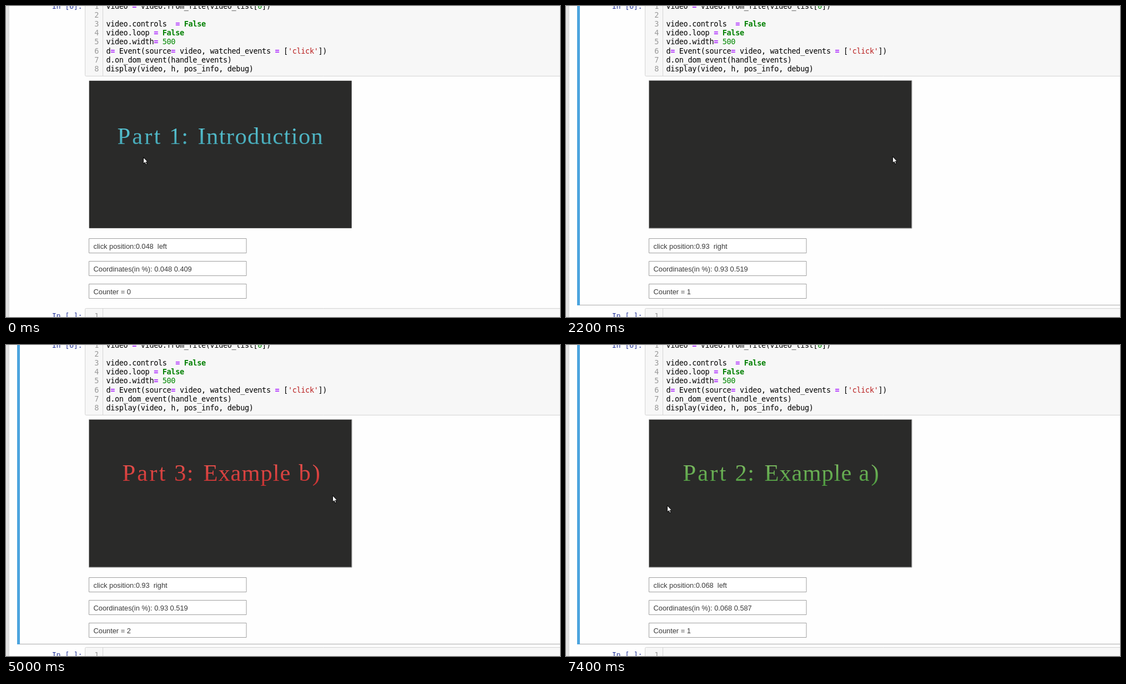
An HTML page with a canvas for the animation above (8000 ms loop, 998 by 561 pixels).

```html
<!DOCTYPE html>
<html lang="en">
<head>
<meta charset="utf-8">
<title>Notebook video player</title>
<style>
html, body { margin: 0; width: 100%; height: 100%; overflow: hidden; background: #fefefe; }
canvas { display: block; }
</style>
</head>
<body>
<canvas id="stage" width="998" height="561"></canvas>
<script>
const ctx = document.getElementById('stage').getContext('2d');
const W = 998, H = 561, LOOP = 8000, STEP = 100;
const MONO = '13.5px "DejaVu Sans Mono", monospace';
const SANS = '12.8px "Liberation Sans", Arial, sans-serif';
const SERIF = '42.6px "Liberation Serif", "Times New Roman", serif';
const TRACKING = '-0.33px', LINE = 16.2, FIRST_BASE = 4.5;

const code = [
  'video = Video.from_file(video_list[0])',
  '',
  'video.controls  = False',
  'video.loop = False',
  'video.width= 500',
  "d= Event(source= video, watched_events = ['click'])",
  'd.on_dom_event(handle_events)',
  'display(video, h, pos_info, debug)'
];

// Each word: text, left edge, letter spacing
const titles = {
  intro: { base: 249, colors: ['#58c6d6', '#42a0ae'], words: [
    ['Part', 200.5, 3.1], ['1:', 294, 1], ['Introduction', 345.5, 1.35]] },
  first: { base: 245, colors: ['#7cbc61', '#4f9c41'], words: [
    ['Part', 210.5, 3.1], ['2:', 304.5, 1.5], ['Example', 357.5, 0.9], ['a)', 527.5, 3]] },
  second: { base: 245, colors: ['#e8504c', '#c83333'], words: [
    ['Part', 209.5, 3.1], ['3:', 303, 1.5], ['Example', 355.5, 0.9], ['b)', 527.5, 3]] }
};

// Player state from each start time on
const scenes = [
  { at: 0, title: 'intro', x: '0.048', y: '0.409', count: 0 },
  { at: 1100, title: 'intro', x: '0.206', y: '0.523', count: 0 },
  { at: 2100, blank: true, x: '0.93', y: '0.519', count: 1 },
  { at: 2200, title: 'first', write: 2300, x: '0.93', y: '0.519', count: 1 },
  { at: 3700, title: 'second', write: 3800, x: '0.93', y: '0.519', count: 2 },
  { at: 6100, blank: true, x: '0.068', y: '0.587', count: 1 },
  { at: 6200, title: 'first', write: 6300, x: '0.068', y: '0.587', count: 1 }
];

const clamp = v => Math.min(1, Math.max(0, v));
const ease = v => v * v * (3 - 2 * v);

function rect(x, y, w, h, fill) {
  ctx.fillStyle = fill;
  ctx.fillRect(x, y, w, h);
}

function frame(x, y, w, h, color) {
  ctx.strokeStyle = color;
  ctx.lineWidth = 1;
  ctx.strokeRect(x, y, w, h);
}

function text(str, x, y, font, color, align = 'left') {
  ctx.font = font;
  ctx.fillStyle = color;
  ctx.textAlign = align;
  ctx.fillText(str, x, y);
}

function codeStyle(token) {
  if (token === '=') return ['bold ', '#aa22ff'];
  if (token === 'False') return ['bold ', '#008000'];
  if (token[0] === "'") return ['', '#ba2121'];
  if (/^\d+$/.test(token)) return ['', '#008800'];
  return ['', '#000'];
}

function codeLine(line, x, y) {
  for (const token of line.split(/(=|False|'.*?'|\b\d+\b)/)) {
    if (!token) continue;
    const [weight, color] = codeStyle(token);
    text(token, x, y, weight + MONO, color);
    x += ctx.measureText(token).width;
  }
}

function inputBox(y, h) {
  rect(143, y, W, h, '#f7f7f7');
  ctx.beginPath();
  ctx.roundRect(142.5, y, W, h, 2);
  ctx.moveTo(174.5, y);
  ctx.lineTo(174.5, y + h);
  ctx.strokeStyle = '#d4d4d4';
  ctx.lineWidth = 1;
  ctx.stroke();
}

function prompt(label, base) {
  text(label, 82.8, base, MONO, '#303f9f');
}

function lineNumber(n, base) {
  text(n, 167, base, MONO, '#999', 'right');
}

function drawPage(dy, selected) {
  rect(0, 0, W, H, '#fefefe');
  const edge = ctx.createLinearGradient(0, 0, 6, 0);
  edge.addColorStop(0, '#e6e6e6');
  edge.addColorStop(1, '#dedede');
  rect(0, 0, 6, H, edge);

  if (selected) {
    rect(20, 539 + dy, W, 1, '#ababab');
    rect(20, 0, 5, 540 + dy, '#4ca4de');
  }

  ctx.letterSpacing = TRACKING;
  inputBox(-20.5, 147);
  prompt('In [6]:', FIRST_BASE);
  code.forEach((line, i) => {
    const base = FIRST_BASE + i * LINE;
    lineNumber(i + 1, base);
    codeLine(line, 180.4, base);
  });

  inputBox(545.5 + dy, 28);
  prompt('In [ ]:', 563.5 + dy);
  lineNumber(1, 563.5 + dy);
  inputBox(584.5 + dy, 28);
  ctx.letterSpacing = '0px';
}

function drawFields(scene, dy) {
  const side = scene.x < 0.5 ? 'left' : 'right';
  const rows = [
    `click position:${scene.x}  ${side}`,
    `Coordinates(in %): ${scene.x} ${scene.y}`,
    `Counter = ${scene.count}`
  ];
  rows.forEach((row, i) => {
    const y = Math.round(419 + i * 40.8) + dy;
    rect(150, y, 283, 26, '#fff');
    frame(149.5, y + 0.5, 283.5, 26, '#a0a0a0');
    text(row, 157.6, y + 18.6, SANS, '#3a3a3a');
  });
}

// Outline is traced first, then the fill fades in
function drawLetter(ch, x, y, p, color) {
  if (p <= 0) return;
  if (p < 1) {
    ctx.save();
    ctx.strokeStyle = color;
    ctx.lineWidth = 0.8;
    ctx.globalAlpha = Math.min(1, 2 * (1 - p));
    ctx.setLineDash([ease(clamp(p * 2)) * 130, 1000]);
    ctx.strokeText(ch, x, y);
    ctx.restore();
  }
  ctx.globalAlpha = clamp(p * 2 - 1);
  ctx.fillText(ch, x, y);
  ctx.globalAlpha = 1;
}

function drawTitle({ base, colors, words }, progress) {
  const shade = ctx.createLinearGradient(0, base - 30, 0, base + 6);
  colors.forEach((c, i) => shade.addColorStop(i, c));
  ctx.font = SERIF;
  ctx.textAlign = 'left';
  ctx.fillStyle = shade;
  const lag = 0.2;
  const total = words.reduce((n, w) => n + w[0].length, 0);
  const time = progress * (1 + lag * (total - 1));
  let index = 0;
  for (const [word, left, spacing] of words) {
    let x = left;
    for (const ch of word) {
      drawLetter(ch, x, base, clamp(time - lag * index++), shade);
      x += ctx.measureText(ch).width + spacing;
    }
  }
}

function drawVideo(scene, t, selected) {
  if (scene.blank) {
    frame(149.5, 134.5, 473.5, 237.5, '#686868');
    return;
  }
  rect(149.7, 134.8, 473, 266, '#2a2a29');
  if (selected) frame(149.5, 134.5, 473.5, 266.5, '#929292');
  const progress = scene.write === undefined ? 1 : clamp((t - scene.write) / 700);
  drawTitle(titles[scene.title], progress);
}

function cursorAt(t) {
  if (t >= 5900) return t < 6400 ? [181.8, 290] : [182.5, 289.4];
  if (t >= 5300) {
    const p = ease(clamp((t - 5300) / 400));
    return [588.5 - 333 * p, 271.4 - 5 * Math.sin(2 * Math.PI * p)];
  }
  const p = ease(clamp((t - 1200) / 600));
  return [247.5 + 341 * p, 272.6 - 1.2 * p - 7 * Math.sin(Math.PI * p)];
}

function drawCursor([x, y]) {
  const shape = [[0, 0], [0, 12], [2.7, 9.5], [4.6, 13.6], [6.6, 12.7], [4.8, 8.8], [8, 8.6]];
  ctx.beginPath();
  for (const [dx, dy] of shape) ctx.lineTo(x + dx, y + dy);
  ctx.closePath();
  ctx.lineJoin = 'round';
  ctx.lineWidth = 1.1;
  ctx.fillStyle = '#fff';
  ctx.strokeStyle = '#111';
  ctx.fill();
  ctx.stroke();
}

function render(now) {
  const t = Math.floor((now % LOOP) / STEP) * STEP;
  const scene = scenes.findLast(s => s.at <= t);
  const dy = scene.blank ? -30 : 0;
  const selected = t >= 1000;
  drawPage(dy, selected);
  drawVideo(scene, t, selected);
  drawFields(scene, dy);
  drawCursor(cursorAt(t));
}

const start = performance.now();
function tick() {
  render(performance.now() - start);
  requestAnimationFrame(tick);
}
tick();
</script>
</body>
</html>
```
